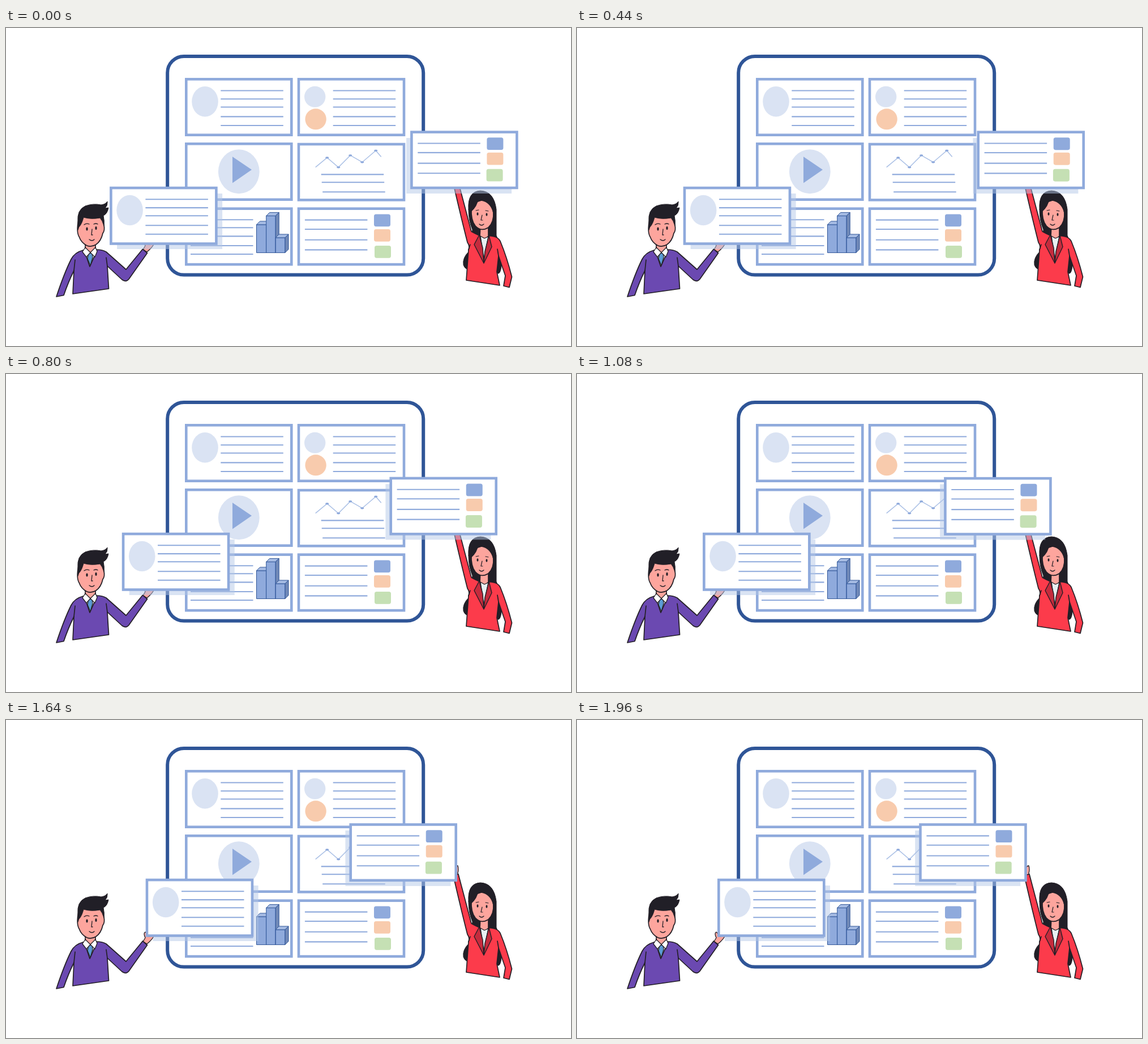
An HTML page for the animation above (2000 ms loop, 998 by 561 pixels).

```html
<!DOCTYPE html>
<html lang="en">
<head>
<meta charset="utf-8">
<title>Card board</title>
<style>
html, body { margin: 0; width: 100%; height: 100%; overflow: hidden; background: #fff; }
svg { display: block; width: 100vw; height: 100vh; }
.ink { stroke: #231f26; stroke-width: 1.7; stroke-linejoin: round; stroke-linecap: round; }
.hair { fill: #211f27; }
.skin { fill: #fda59d; }
.suit { fill: #6b49b1; }
.jacket { fill: #fc3b4b; }
.line { fill: none; }
</style>
</head>
<body>
<svg viewBox="0 0 998 561">
  <rect x="285.2" y="50" width="452" height="385.5" rx="29" fill="#fff" stroke="#2f5597" stroke-width="6"/>
  <g id="board"></g>

  <g id="man" class="ink">
    <path class="skin" d="M242 391L246 384Q242 376 246 374Q250 377 252 382L262 380Q258 388 249 395Z" stroke-width="1.3"/>
    <path class="suit" d="M136 392Q121 396 115 408Q103 432 89 474L102 471.5Q110 448 120 428L118 469L181.5 460L179 420L205 444Q212 449 217 443L249.5 397L241.5 390L212 426L177 395Q170 391 161 391Z"/>
    <path class="line" d="M120 428L122 409M179 420L177 405"/>
    <path class="skin" d="M140 376L140 390L149 397L158 390L158 378Z"/>
    <path d="M139 394L148 421L160 394L149 396Z" fill="#e6eef5"/>
    <path d="M146 396H152L153 405L149 419L144 407Z" fill="#5b9bd5" stroke-width="1.2"/>
    <path d="M140 387L135 395L142 404L149 396L157 404L161 394L158 387L149 396Z" fill="#fff" stroke-width="1.3"/>
    <path class="skin" d="M128 338Q124 360 129 368Q133 379 143 384Q151 387 159 382Q168 376 171 362Q175 357 173 348L171 331L135 328Z"/>
    <path class="hair" d="M127 356L127 342Q125 321 140 314Q154 309 168 312Q176 311 179 306Q180 313 175 318L181 317Q179 328 172 331Q174 340 173 349Q170 339 166 335Q150 338 137 334Q134 346 129 351Z" stroke-width="1"/>
    <path class="line" d="M138 347Q142 344 147 346M155 346Q159 344 162 346M152 355L151 365H153M147 373Q152 377 156 373" stroke-width="1.3"/>
    <ellipse class="hair" cx="143" cy="354.5" rx="1.6" ry="3" stroke="none"/>
    <ellipse class="hair" cx="159" cy="353" rx="1.6" ry="3" stroke="none"/>
  </g>

  <g id="woman" class="ink">
    <path class="hair" d="M817 320Q815 288 838 287Q862 288 866 320L866 366Q876 385 875 420Q873 437 867 432L820 426Q811 427 808 418Q806 405 818 394L824 356Q817 340 817 320Z" stroke-width="1"/>
    <path class="skin" d="M791 278L792 264Q794 257 798 257Q800 264 798 270L800 278Z" stroke-width="1.3"/>
    <path class="jacket" d="M790 274L799 272L822 359Q831 364 836 366L857 367Q869 368 873 376Q885 405 893.5 439L889 457.5L879 455L882 437L870 402L867 430L872 454L813 445L817 391Q820 386 815 378Q804 335 790 274Z"/>
    <path class="line" d="M870 402L868 390M817 391L820 382"/>
    <path class="skin" d="M838 348L837 367L845 374L852 367L852 350Z"/>
    <path d="M838 367L844 407L852 368L845 371Z" fill="#e8f0f2" stroke-width="1.3"/>
    <path d="M836 365L827 382L844 415L842 388ZM853 366L858 386L844 415L846 394Z" fill="#c52b3d" stroke-width="1.4"/>
    <path class="skin" d="M822 319Q821 339 829 349Q839 360 852 352Q862 343 861 325Q856 307 840 304Q826 307 822 319Z"/>
    <path class="hair" d="M820 325Q819 306 832 302Q844 300 853 309Q861 318 861 339L864 319Q858 292 838 291Q817 293 818 325ZM834 302Q833 314 822 324L819 309Z" stroke="none"/>
    <path class="line" d="M830 322L835 321M847 322L852 323M841 330L839 339H842M836 346Q840 350 844 346" stroke-width="1.2"/>
    <ellipse class="hair" cx="833" cy="328" rx="1.5" ry="2.7" stroke="none"/>
    <ellipse class="hair" cx="849" cy="329" rx="1.5" ry="2.7" stroke="none"/>
  </g>

  <g id="profileCard"></g>
  <g id="swatchCard"></g>
</svg>
<script>
const BLUE = '#8faadc', PALE = '#dae3f3', PEACH = '#f8cbad', GREEN = '#c5e0b4', NAVY = '#2f5597';
const el = id => document.getElementById(id);

const frame = () => `<rect x="2.3" y="2.3" width="186" height="98.4" fill="#fff" stroke="${BLUE}" stroke-width="4.6"/>`;
const shadow = (x, y) => `<rect x="${x}" y="${y}" width="186" height="98" fill="#b4c7e7" fill-opacity=".5"/>`;
const oval = (cx, cy, rx, ry, fill) => `<ellipse cx="${cx}" cy="${cy}" rx="${rx}" ry="${ry}" fill="${fill}"/>`;
const rules = (x, ys) => `<path d="${ys.map(y => `M${x} ${y}h110.5`).join('')}" stroke="${BLUE}" stroke-width="2.1"/>`;
const swatch = (x, y, fill) => `<rect x="${x}" y="${y}" width="29" height="21.8" rx="3.6" fill="${fill}"/>`;
const tile = (x, y, content) => `<g transform="translate(${x} ${y})">${frame()}${content}</g>`;

const textRows = [22.5, 37.3, 51.5, 68.4, 84];
const profile = () => oval(35.5, 41.7, 23.3, 26.8, PALE) + rules(63.3, textRows);
const swatches = greenX => rules(13.2, [22.2, 38.6, 57.3, 75]) +
  swatch(135.3, 12, BLUE) + swatch(135.3, 38.5, PEACH) + swatch(greenX, 67.5, GREEN);

function trend() {
  const pts = [[32, 43], [52.5, 26], [72.5, 43], [93.5, 22], [114.5, 34], [138.5, 13.5], [148, 24.5]];
  return `<polyline points="${pts.join(' ')}" fill="none" stroke="#a9bfe5" stroke-width="1.5"/>` +
    pts.slice(1, -1).map(([x, y]) => oval(x, y, 3, 1.7, BLUE)).join('') +
    rules(42, [55.7]) + rules(43, [69.6]) + rules(44.5, [86.5]);
}

function bar(x, y, w) {
  const base = 80, d = 6;
  return `<g stroke="${NAVY}" stroke-width="1" stroke-linejoin="round">
    <path d="M${x} ${y}h${w}V${base}h${-w}z" fill="${BLUE}"/>
    <path d="M${x} ${y}l${d} ${-d}h${w}l${-d} ${d}z" fill="#a5bbe3"/>
    <path d="M${x + w} ${y}l${d} ${-d}V${base - d}l${-d} ${d}z" fill="#7089b8"/></g>`;
}

const play = oval(95.3, 51.3, 36.4, 39, PALE) + `<path d="M84 25l34 23-34 23.5z" fill="${BLUE}"/>`;
const people = oval(31, 33.3, 18.7, 18.5, PALE) + oval(32.4, 72.8, 18.7, 18.5, PEACH) + rules(63, textRows);
const bars = rules(10, [21.8, 35.8, 51, 67.6, 82.6]) +
  bar(126.5, 30.5, 17.5) + bar(143.7, 15, 16.5) + bar(160.2, 53.5, 16.8);

el('board').innerHTML =
  tile(316, 88, profile()) + tile(514.7, 88, people) +
  tile(316, 202, play) + tile(514.7, 202.7, trend()) +
  tile(316, 316.4, bars) + tile(514.7, 316.4, swatches(136.3));
el('profileCard').innerHTML = shadow(13, 12.2) + frame() + profile();
el('swatchCard').innerHTML = shadow(-7, 12.7) + frame() + swatches(134.5);

const LOOP = 2000, STEP = 40, DELAY = 163, GLIDE = 1625;
const mix = (a, b, k) => a + (b - a) * k;

function render(ms) {
  const t = Math.floor(ms % LOOP / STEP) * STEP;
  const u = Math.min(1, Math.max(0, (t - DELAY) / GLIDE));
  const k = (1 - Math.cos(Math.PI * u)) / 2;
  el('profileCard').setAttribute('transform', `translate(${mix(183.1, 248, k)} 279.8)`);
  el('swatchCard').setAttribute('transform', `translate(${mix(714.1, 604.2, k)} ${mix(181.3, 182.2, k)})`);
}

const start = performance.now();
function tick() {
  render(performance.now() - start);
  requestAnimationFrame(tick);
}
tick();
</script>
</body>
</html>
```
